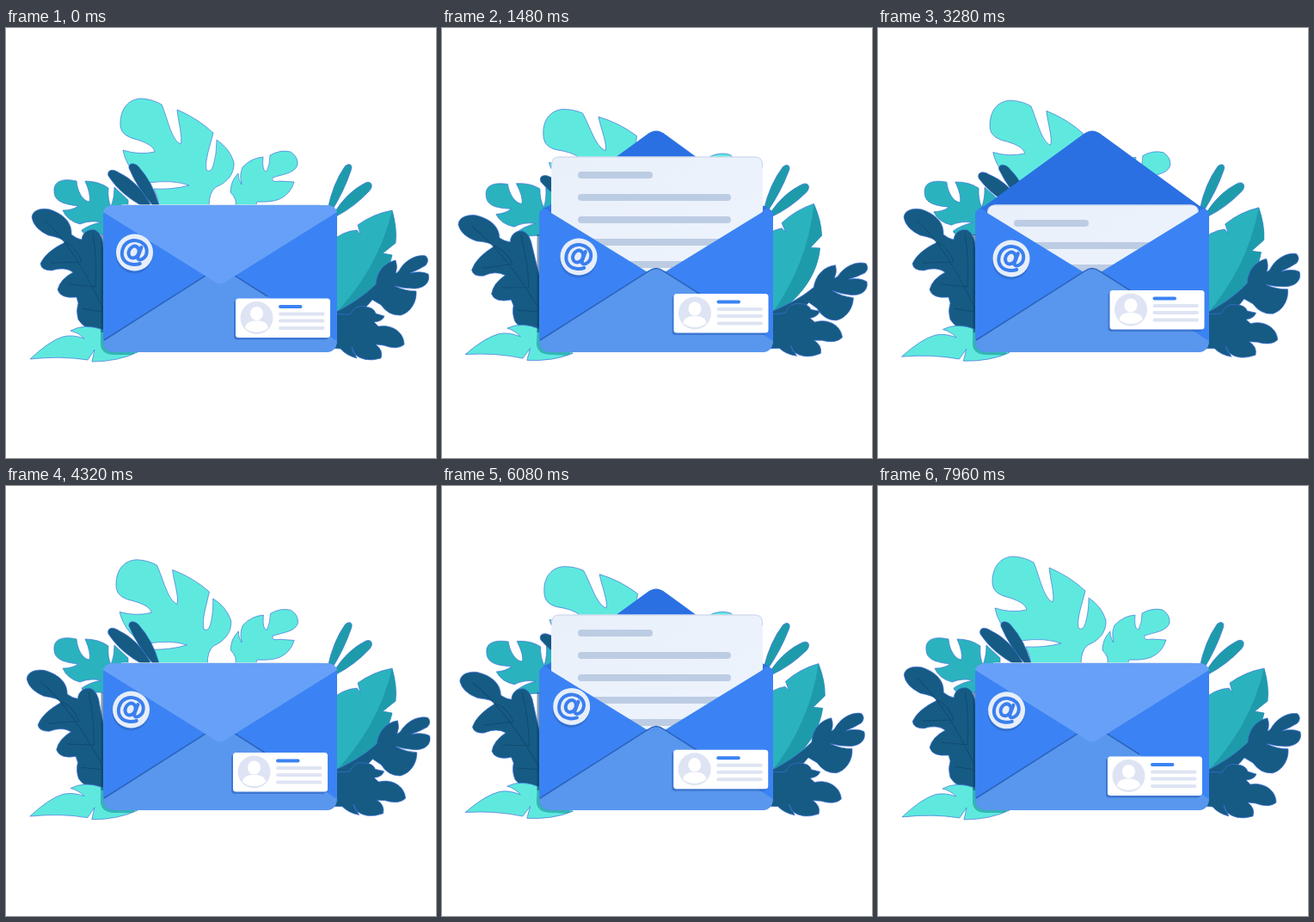
Write an HTML page that moves like this. It is 500 px wide and 500 px high and loops after 8000 ms.

```html
<!DOCTYPE html>
<html lang="en">
<head>
<meta charset="utf-8">
<title>Envelope</title>
<style>
  html, body { margin: 0; width: 100%; height: 100%; overflow: hidden; background: #fff; }
  svg { display: block; width: 100%; height: 100%; }

  .leaf { stroke: #3f70dc; stroke-opacity: .75; stroke-width: .9; stroke-linejoin: round; }
  .mint { fill: #5fe9de; }
  .teal { fill: #2ab3be; }
  .deep { fill: #1e9bab; }
  .navy { fill: #165b84; }
  .vein { fill: none; stroke: #104b70; stroke-width: 1; }

  .back-flap, .front-flap, .paper { animation: 4s infinite both; }
  .back-flap { transform-origin: 249px 212px; animation-name: back-flap; }
  .front-flap { transform-origin: 249px 206px; animation-name: front-flap; }
  .paper { animation-name: paper; }
  .row { height: 8px; fill: #bccce3; animation: write 4s linear infinite both; }

  @keyframes back-flap {
    0%, 15% { transform: scaleY(0); animation-timing-function: ease-out; }
    20%, 84% { transform: scaleY(1); animation-timing-function: ease-in; }
    89%, 100% { transform: scaleY(0); }
  }
  @keyframes front-flap {
    0%, 10% { transform: scaleY(1); animation-timing-function: ease-in; }
    15%, 89% { transform: scaleY(0); animation-timing-function: ease-out; }
    94%, 100% { transform: scaleY(1); }
  }
  @keyframes paper {
    0%, 20% { transform: translateY(56px); animation-timing-function: ease-in-out; }
    30%, 72% { transform: none; animation-timing-function: ease-in-out; }
    81%, 100% { transform: translateY(56px); }
  }
  @keyframes write {
    0%, 21.5% { width: 0; }
    26.5%, 95% { width: var(--w); }
    95.1%, 100% { width: 0; }
  }
</style>
</head>
<body>
<svg viewBox="0 0 500 500">
  <defs>
    <path id="fern" d="M28 385Q50 364 66 359Q77 356 91 361Q84 354 75 352Q91 343 113 351L153 377Q130 388 100 388L103 374L95 386Q64 381 28 385Z"/>
    <clipPath id="fern-clip"><use href="#fern"/></clipPath>
    <linearGradient id="sheet" x2="1" y2="1">
      <stop stop-color="#e9f0fa"/><stop offset="1" stop-color="#eef4fd"/>
    </linearGradient>
  </defs>

  <g id="bigMint">
    <path class="leaf mint" d="M133 114C132 96 141 82 158 82Q171 83 181 89C188 105 192 130 203 135C206 128 200 108 199 95Q223 105 241 122C237 138 231 154 233 165Q238 169 241 160Q245 147 245 130Q260 140 265 156C266 172 254 181 244 185Q236 191 236 207H178Q177 196 172 187Q194 188 213 183Q194 176 166 180C150 174 139 158 136 142Q155 148 173 144Q172 136 153 130Q134 126 133 114Z"/>
  </g>
  <g id="smallMint">
    <path class="leaf mint" d="M261 191Q261 178 270 169Q270 177 274 182Q271 171 275 162Q285 151 299 150C298 159 299 167 303 167Q307 159 307 148Q319 141 331 144Q340 150 339 159C336 169 322 170 310 174Q308 180 318 178L335 179Q331 193 318 199Q308 203 292 202L290 208H266Q270 200 261 191Z"/>
  </g>
  <g id="leftTeal">
    <path class="leaf teal" d="M56 190C55 179 64 174 82 178C83 190 89 201 97 202Q99 194 92 178Q108 178 119 186Q118 199 122 208Q126 198 126 185L142 200V240H94Q88 238 88 235Q98 228 111 226Q98 223 86 228Q71 224 66 212Q77 212 84 207C68 205 56 202 56 190Z"/>
  </g>
  <g id="leftSprigs" class="leaf navy">
    <path d="M143 163C142 157 149 156 154 161Q171 180 178 206L172 208Q153 187 143 163Z"/>
    <path d="M119 172C117 165 124 163 131 168Q153 178 168 205L162 209Q133 194 119 172Z"/>
  </g>
  <g id="rightSprigs" class="leaf deep">
    <path d="M374 211Q380 181 394 161C399 156 404 159 401 166Q393 190 378 214Z"/>
    <path d="M381 216Q396 191 418 180C425 177 428 184 422 190Q405 208 384 219Z"/>
  </g>
  <g id="rightTeal">
    <path class="leaf teal" d="M376 335V250Q391 236 408 235L412 240L409 229Q427 216 449 212Q455 233 453 250L438 262L449 264C443 291 420 322 376 335Z"/>
    <path class="deep" d="M449 212Q455 233 453 250L438 262L449 264C443 291 420 322 380 335Q432 282 449 212Z"/>
  </g>
  <g id="rightNavy">
    <path class="leaf navy" d="M376 334Q410 318 430 298C431 284 439 273 453 270Q456 278 453 285Q456 285 459 279C466 269 478 263 488 265Q493 270 488 276Q480 281 470 285Q483 282 491 286C494 296 486 303 474 303Q463 303 452 300Q464 306 477 306C478 319 470 331 459 334Q445 335 436 322L426 316Q412 336 376 343Z"/>
  </g>
  <g id="lowNavy">
    <path class="leaf navy" d="M376 332Q392 333 400 333Q406 321 418 324Q428 325 430 332L440 335Q438 341 428 342L433 347C449 344 463 354 463 368Q455 375 439 369L430 368Q439 375 436 384Q416 390 404 378L402 371L408 384Q396 381 389 373L376 372Z"/>
  </g>
  <g id="oak">
    <path class="leaf navy" d="M30 220C31 211 42 209 51 211C69 217 77 228 76 240Q82 245 88 246C89 237 97 233 104 235Q112 239 113 255L123 330V358Q92 353 84 339Q81 329 84 320L82 313Q63 315 60 304Q63 292 78 284Q68 277 53 282Q41 282 40 274Q46 260 69 249Q65 244 49 241Q32 233 30 220Z"/>
    <path class="vein" d="M45 223Q82 258 116 333M67 248Q82 254 88 272L52 273M101 239Q106 270 104 301L73 298M113 330L88 326"/>
  </g>
  <g id="fernLeaf">
    <use href="#fern" class="leaf mint"/>
    <path d="M110 340V368Q111 380 126 380H150V340Z" fill="#128b92" opacity=".55" clip-path="url(#fern-clip)"/>
  </g>
  <rect x="110.500" y="240" width="4" height="114" fill="#0b3a5c" opacity=".5"/>

  <path class="back-flap" fill="#2a70e3" d="M113 215L238 124Q249 115 260 124L385 215Z"/>
  <rect x="113" y="207" width="272" height="165" rx="13" fill="#2f74e6"/>
  <g class="paper">
    <rect x="127" y="149.500" width="246" height="162" rx="9" fill="url(#sheet)"/>
    <path d="M127.500 162V159Q127.500 150 136 150H364Q372.500 150 372.500 159V162" fill="none" stroke="#c9d3e8"/>
    <g id="rows"></g>
  </g>

  <path fill="#3b83f4" d="M113 218Q113 211 120 210Q123 211 127 215L249 290L371 215Q375 211 378 210Q385 211 385 218V363Q385 377 371 377H127Q113 377 113 363Z"/>
  <path fill="#5997ee" d="M113 364L240 283Q249 276 258 283L385 364Q384 377 371 377H127Q114 377 113 364Z"/>
  <path fill="none" stroke="#2c63bd" stroke-width="1.500" d="M114 363L240 283Q249 276 258 283L304 312"/>
  <path class="front-flap" fill="#67a0f8" d="M113 214Q115 206 126 206H373Q383 206 385 214L257 294Q249 301 241 294Z"/>

  <g id="badge">
    <circle cx="-.5" cy="3" r="21.500" fill="#2c63bd" opacity=".55"/>
    <circle r="21.500" fill="#e7eefa"/>
    <g fill="none" stroke="#3b7fee" stroke-width="4" stroke-linecap="round" transform="rotate(8)">
      <ellipse cx="-1" cy="0" rx="5.800" ry="7.200" transform="rotate(18)"/>
      <path d="M7 -7L4.600 4C4 8 7 8 9 7Q14 4 14 -2C14 -9 8 -14 0 -14C-9 -14 -14.500 -7 -14.500 1C-14.500 9 -9 14 -1 14Q4 14 8 12"/>
    </g>
  </g>

  <g id="card">
    <rect x="-2" y="2" width="110" height="46" rx="4" fill="#2c63bd" opacity=".6"/>
    <rect width="110" height="45.500" rx="3.500" fill="#fff"/>
    <circle cx="24.500" cy="22.500" r="19" fill="#dee4f3"/>
    <ellipse cx="24.500" cy="17.500" rx="7.500" ry="8" fill="#fff"/>
    <path d="M11 34Q12 27 21 26H28Q37 27 38 34Q33 39 24.500 39Q16 39 11 34Z" fill="#fff"/>
    <g stroke-width="4" stroke-linecap="round" stroke="#dee4f3">
      <path d="M52 9.500H75.500" stroke="#3b83f4"/>
      <path d="M52 18H101.500M52 26H101.500M52 34.500H101.500"/>
    </g>
  </g>
</svg>
<script>
  const $ = id => document.getElementById(id);

  [87, 178, 178, 178, 178].forEach((w, i) => {
    $('rows').innerHTML += `<rect class="row" x="158" y="${167 + i * 26}" rx="4"
      style="--w:${w}px;animation-delay:${i * 0.12}s"/>`;
  });

  const SHORT = { period: 4000, at: [0, 320, 1400, 2840, 3280] };
  const LONG = { period: 8000, at: [0, 1480, 3280, 4320, 5320, 6840] };

  // Smooth periodic curve through values placed at the times of a beat.
  function curve({ period, at }, values) {
    const n = at.length;
    const time = i => at[(i + n) % n] + Math.floor(i / n) * period;
    const val = i => values[(i + n) % n];
    const slope = i => (val(i + 1) - val(i - 1)) / (time(i + 1) - time(i - 1));
    return now => {
      const t = now % period;
      let i = n - 1;
      while (at[i] > t) i--;
      const d = time(i + 1) - time(i), u = (t - time(i)) / d, v = 1 - u;
      return v * v * ((1 + 2 * u) * val(i) + u * d * slope(i))
           + u * u * ((3 - 2 * u) * val(i + 1) - v * d * slope(i + 1));
    };
  }

  const sways = [
    ['bigMint', 268, 260, SHORT, [0, -1.9, -6, -3.9, -1.1]],
    ['smallMint', 285, 205, SHORT, [0, 0.5, 4, 4, 1]],
    ['leftTeal', 130, 260, LONG, [0, -4, -1.5, 0, -2, -4]],
    ['leftSprigs', 172, 208, SHORT, [0, 0, -7, -6, -3]],
    ['rightSprigs', 378, 216, SHORT, [0, 0.3, 2.2, 2.2, 0.8]],
    ['rightTeal', 385, 330, LONG, [0, -7.8, -3, 0, -3.4, -5.9]],
    ['rightNavy', 390, 325, LONG, [0, 5, -1.5, 2.5, 3.8, -4]],
    ['lowNavy', 385, 340, LONG, [0, -6, -4, -3.5, 0, -5.5]],
    ['oak', 110, 330, SHORT, [0, -3.1, -6, -2.6, 0]],
    ['fernLeaf', 130, 365, SHORT, [0, 0.5, 3, 2.6, 1.6]]
  ].map(([id, x, y, beat, angles]) => {
    const angle = curve(beat, angles), el = $(id);
    return t => el.setAttribute('transform', `rotate(${angle(t)} ${x} ${y})`);
  });

  const drifts = [
    ['badge', [149.5, 159, 155, 145.5, 141, 159.5], [261, 266, 268, 260, 261, 253]],
    ['card', [267, 269.5, 269.5, 264, 270.5, 267], [314.5, 309, 305, 310, 308, 307]]
  ].map(([id, xs, ys]) => {
    const x = curve(LONG, xs), y = curve(LONG, ys), el = $(id);
    return t => el.setAttribute('transform', `translate(${x(t)} ${y(t)})`);
  });

  const movers = [...sways, ...drifts];
  const pose = t => movers.forEach(move => move(t));
  let start;
  function frame(now) {
    start ??= now;
    pose(now - start);
    requestAnimationFrame(frame);
  }
  pose(0);
  requestAnimationFrame(frame);
</script>
</body>
</html>
```
